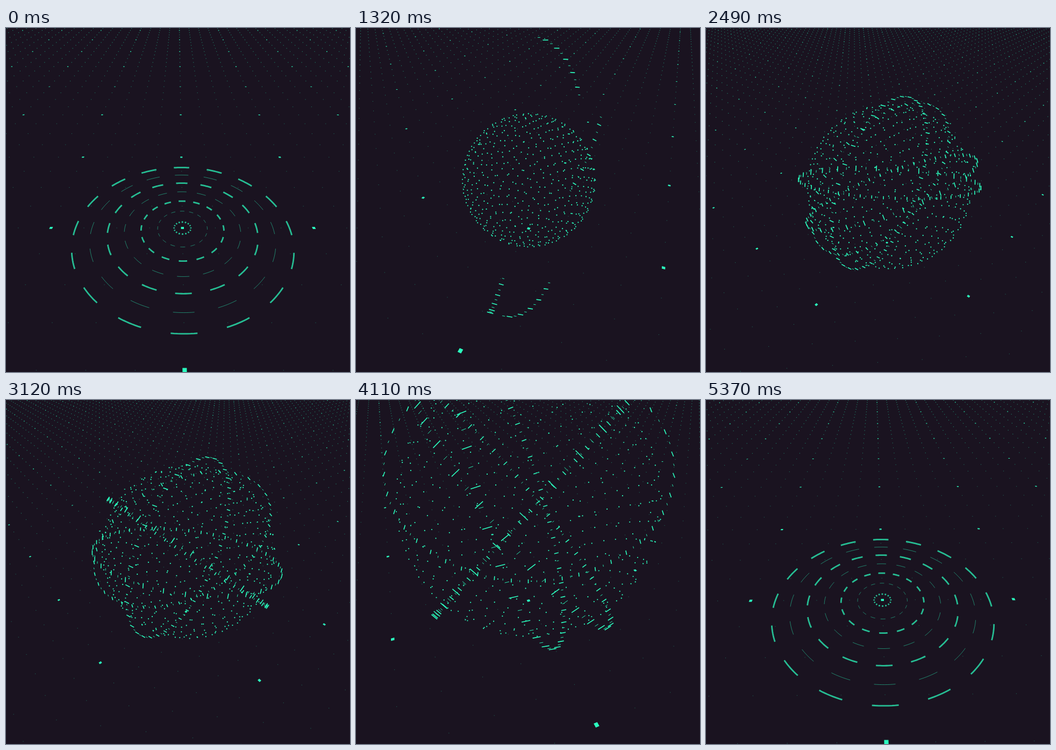
Recreate the animation shown at these times as an HTML page with a canvas. Size 640x640 px, loop 5400 ms.

```html
<!DOCTYPE html>
<html lang="en">
<head>
<meta charset="utf-8">
<title>Orbital grid</title>
<style>
  html, body { margin: 0; width: 100%; height: 100%; overflow: hidden; background: #1a1320; }
  canvas { display: block; width: 640px; height: 640px; }
</style>
</head>
<body>
<canvas id="stage" width="640" height="640"></canvas>
<script>
const ctx = document.getElementById('stage').getContext('2d');
const SIZE = 640, HALF = 320, LOOP = 5400, TAU = Math.PI * 2;
const BACK = '#1a1320', ACCENT = '#2bffbf';
const FOCAL = HALF / Math.tan(Math.PI / 6);
const PITCH = 40.4 * Math.PI / 180, SIN = Math.sin(PITCH), COS = Math.cos(PITCH);
const GRID = 13, STEPS = 4;
const DOTS = 520, TICKS = 72;

// Orbit rings: major-axis angle and signed tilt at each key time, centre of the last arc.
const KEYS = [1860, 3120, 3600, 4650];
const ORBITS = [
  { angle: [-71, -25, -10, 11],  tilt: [-.46, -.56, -.58, -.5], hub: 180 },
  { angle: [-50, 7, 31, 75],     tilt: [.1, .38, .33, .2],      hub: 180 },
  { angle: [109, 114, 113, 152], tilt: [.46, .4, .13, -.4],     hub: 180 },
  { angle: [-28, 34, 54, 100],   tilt: [-.27, .05, .04, .45],   hub: -52 }
];

const rad = deg => deg * Math.PI / 180;
const clamp = (v, lo, hi) => Math.min(hi, Math.max(lo, v));
const ease = x => x < .5 ? 4 * x ** 3 : 1 - 4 * (1 - x) ** 3;
const ramp = (t, start, length) => ease(clamp((t - start) / length, 0, 1));

function keyed(values, t) {
  let i = 0;
  while (i < KEYS.length - 2 && t > KEYS[i + 1]) i++;
  const k = (t - KEYS[i]) / (KEYS[i + 1] - KEYS[i]);
  return values[i] + (values[i + 1] - values[i]) * k;
}

// Cubic in Newton form, driven by the cosine of the loop phase.
function drift(c, a, b, d, e) {
  const p = c + .883, q = c + .53, r = c - .643;
  return a + p * (b + q * (d + r * e));
}

function cameraAt(t) {
  const c = Math.cos(TAU * t / LOOP), turn = t / LOOP * Math.PI / 2;
  return {
    x: drift(c, .0856, -.1235, .063, -.0006),
    y: drift(c, .422, -.384, .2219, -.1221),
    z: drift(c, 3.165, -1.215, .5069, -.0682),
    ct: Math.cos(turn), st: Math.sin(turn)
  };
}

function project(x, y, z) {
  const s = FOCAL / z;
  return [HALF + x * s, HALF + y * s, s];
}

// World point: u to the right, v away from the viewer, h up.
function place(cam, u, v, h = 0) {
  const a = u * cam.ct + v * cam.st, b = v * cam.ct - u * cam.st;
  return project(cam.x + a, cam.y - b * SIN - h * COS, cam.z + b * COS - h * SIN);
}

function drawGrid(cam) {
  const n = GRID * STEPS, side = .011;
  ctx.fillStyle = ACCENT;
  for (let i = -n; i <= n; i++) {
    for (let j = -n; j <= n; j++) {
      const u = i / STEPS, v = j / STEPS;
      const [x, y, s] = place(cam, u, v);
      if (s < 0 || x < -9 || x > SIZE + 9 || y < -9 || y > SIZE + 9) continue;
      if (i % STEPS || j % STEPS) {
        const d = 1.15;
        ctx.globalAlpha = clamp(50 / s, .32, .5);
        ctx.fillRect(x - d / 2, y - d / 2, d, d);
      } else if (s < 110) {
        ctx.globalAlpha = .75;
        ctx.fillRect(x - s * .011, y - .8, s * .022, 1.6);
      } else {
        ctx.globalAlpha = 1;
        ctx.beginPath();
        for (const [a, b] of [[-1, -1], [1, -1], [1, 1], [-1, 1]]) {
          const [px, py] = place(cam, u + a * side, v + b * side);
          ctx.lineTo(px, py);
        }
        ctx.fill();
      }
    }
  }
  ctx.globalAlpha = 1;
}

function drawGroundRings(cam, scale) {
  if (scale < .005) return;
  ctx.strokeStyle = ACCENT;
  for (let k = 0; k < 7; k++) {
    const r = (.0637 + .125 * k) * scale, thin = k % 2;
    ctx.globalAlpha = thin ? .6 : .72;
    ctx.lineWidth = thin ? .8 : 2.8;
    ctx.beginPath();
    for (let i = 0; i < 16; i++) {
      for (let j = -4; j <= 4; j++) {
        const a = i * TAU / 16 + rad(j * 1.31);
        const [x, y] = place(cam, r * Math.sin(a), r * Math.cos(a));
        j === -4 ? ctx.moveTo(x, y) : ctx.lineTo(x, y);
      }
    }
    ctx.stroke();
  }
  ctx.globalAlpha = 1;
}

function drawSphere(cam, radius) {
  if (radius < .005) return;
  const golden = Math.PI * (3 - Math.sqrt(5));
  ctx.fillStyle = ACCENT;
  for (let i = 0; i < DOTS; i++) {
    const h = 1 - 2 * (i + .5) / DOTS, r = Math.sqrt(1 - h * h) * radius;
    const [x, y] = place(cam, r * Math.cos(i * golden), r * Math.sin(i * golden), radius * (1.04 + h));
    ctx.beginPath();
    ctx.arc(x, y, 1.1, 0, TAU);
    ctx.fill();
  }
}

function drawOrbits(cam, t, lift, open) {
  if (open < .005) return;
  const centre = [cam.x, cam.y - lift * COS, cam.z - lift * SIN];
  const radius = .82 + .06 * (1 - open);
  ctx.strokeStyle = ACCENT;
  for (const orbit of ORBITS) {
    const phi = rad(keyed(orbit.angle, t));
    const m = clamp(keyed(orbit.tilt, t), -.95, .95), depth = Math.sqrt(1 - m * m);
    const c = Math.cos(phi), s = Math.sin(phi);
    const major = [c, s, 0], minor = [-s * m, c * m, -depth], axis = [-s * depth, c * depth, m];
    for (let i = 0; i < TICKS; i++) {
      const offset = (i / TICKS - .5) * TAU;
      if (Math.abs(offset) > open * Math.PI + .01) continue;
      const a = rad(orbit.hub) + offset;
      const half = i % 2 ? .009 : .019;
      const end = side => project(...centre.map((o, k) =>
        o + radius * (major[k] * Math.cos(a) + minor[k] * Math.sin(a)) + side * half * axis[k]));
      const [x1, y1] = end(-1), [x2, y2] = end(1);
      ctx.lineWidth = i % 2 ? .9 : 1.6;
      ctx.beginPath();
      ctx.moveTo(x1, y1);
      ctx.lineTo(x2, y2);
      ctx.stroke();
    }
  }
}

function render(t) {
  const cam = cameraAt(t);
  const rings = 1 - ramp(t, 600, 600) + ramp(t, 4750, 600);
  const ball = .742 * (ramp(t, 1000, 600) - ramp(t, 4420, 600));
  const open = ramp(t, 1100, 650) - ramp(t, 4243, 650);
  ctx.fillStyle = BACK;
  ctx.fillRect(0, 0, SIZE, SIZE);
  drawGrid(cam);
  drawGroundRings(cam, rings);
  drawSphere(cam, ball);
  drawOrbits(cam, t, ball * 1.04, open);
}

const start = performance.now();
function tick() {
  render((performance.now() - start) % LOOP);
  requestAnimationFrame(tick);
}
tick();
</script>
</body>
</html>
```
